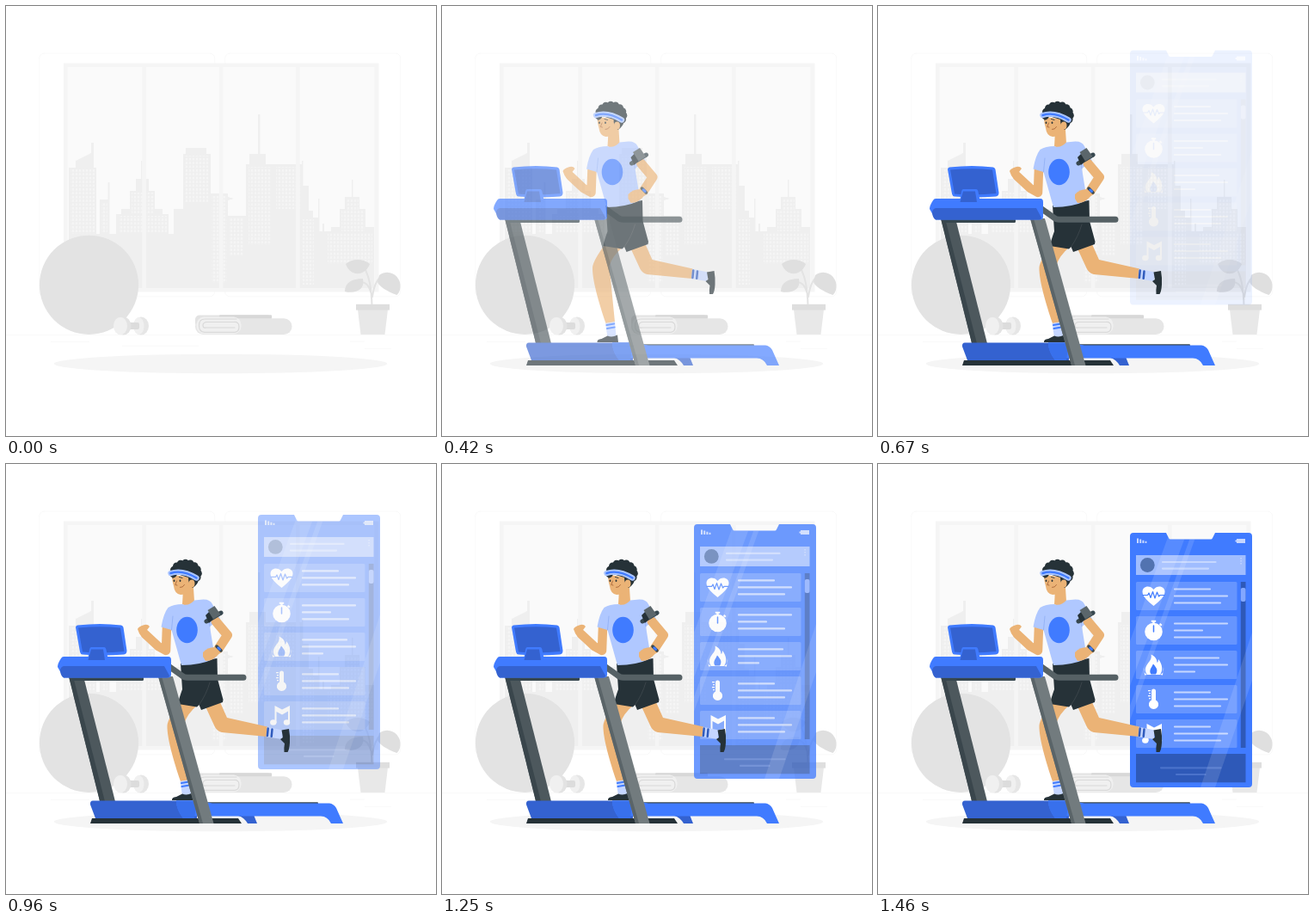
These frames come from a looping animation (500x500 px, 1.5 s). An HTML page:

```html
<!DOCTYPE html>
<html lang="en">
<head>
<meta charset="utf-8">
<title>Treadmill run</title>
<style>
html, body { margin: 0; width: 100%; height: 100%; overflow: hidden; background: #fff; }
svg { display: block; width: 100vw; height: 100vh; }
.limb { fill: none; stroke: #ebb376; stroke-linecap: round; stroke-linejoin: round; }
.line { fill: none; stroke-linecap: round; stroke-linejoin: round; }
</style>
</head>
<body>
<svg viewBox="0 0 500 500" xmlns="http://www.w3.org/2000/svg">
<defs>
  <pattern id="panes" width="4" height="4.4" patternUnits="userSpaceOnUse">
    <rect x=".8" y=".8" width="2.3" height="2.6" fill="#f5f5f5"/>
  </pattern>
  <clipPath id="screen"><path id="body" d="M297 80H335L338 86Q338.600 87.500 340 87.500H387Q388.400 87.500 389 86L392 80H431Q435 80 435 84V372Q435 376 431 376H297Q293 376 293 372V84Q293 80 297 80Z"/></clipPath>
</defs>

<g id="room">
  <g fill="none" stroke="#ebebeb" stroke-width=".3">
    <rect x="38.700" y="55.100" width="204" height="282.700" rx="5.600"/>
    <rect x="254.700" y="55.100" width="204" height="282.700" rx="5.600"/>
    <path d="M0 382.500H500M52 390.500H97M135 395.300H224M400 390H417M417 398.300H448"/>
  </g>
  <rect x="67" y="66.500" width="366.500" height="266" fill="#f5f5f5"/>
  <rect x="71.500" y="71" width="357" height="257" fill="#fafafa"/>
  <path fill="#efefef" d="M73 328V188H81V180L99 171V159H102V188H105V265H109V225H118.500V205H120.500V265H128V242H134V236H144V215H151V201H157V180H158.500V201H166V215H173V236H182V242H189V265H195V236H206V172H209V165H233V172H238V218H258V222L265 224L258 226V244H279V184H283V172H293V126H295.500V172H302V184H344V180H345.500V209H352V238H357V246H363V224H364.500V262H368V253H370V262H378V257H388V236H394V222H402V202H403.500V222H411V236H418V257H428V328Z"/>
  <path fill="url(#panes)" d="M75 190H103V265H75ZM111 228H118V264H111ZM131 244H187V264H131ZM146 217H172V242H146ZM208 174H236V228H208ZM239 221H257V322H239ZM259 246H276V290H259ZM282 187H308V278H282ZM314 187H342V236H314ZM345 248H358V324H345ZM374 264H426V300H374ZM390 238H417V262H390ZM396 224H410V238H396Z"/>
  <path fill="#f5f5f5" d="M158.300 71H163V328H158.300ZM247.800 71H252.500V328H247.800ZM337 71H341.700V328H337Z"/>

  <circle cx="96.500" cy="324.300" r="57.600" fill="#e3e3e3"/>
  <ellipse cx="157" cy="372" rx="9" ry="10.600" fill="#e6e6e6"/>
  <ellipse cx="154.500" cy="372" rx="6" ry="10" fill="#f0f0f0"/>
  <rect x="141" y="368" width="14" height="8" rx="2" fill="#dcdcdc"/>
  <ellipse cx="136.500" cy="372" rx="9" ry="10.600" fill="#e3e3e3"/>
  <ellipse cx="133" cy="372" rx="8" ry="10.300" fill="#f0f0f0"/>

  <rect x="220" y="359.500" width="89" height="14" rx="5" fill="#e3e3e3"/>
  <rect x="248" y="359.300" width="61" height="4.200" rx="1" fill="#d8d8d8"/>
  <rect x="220" y="363.300" width="112.500" height="18.700" rx="9.300" fill="#e6e6e6"/>
  <rect x="221.500" y="361.500" width="52" height="20" rx="9" fill="#f0f0f0"/>
  <path class="line" stroke="#d9d9d9" stroke-width="1.200" d="M268 364H231Q224.500 364 224.500 371.500T231 379.300H266Q271 379 271 373T265 367.500H233Q229 368 229 371.500T233 374H266"/>

  <path class="line" stroke="#e3e3e3" stroke-width="2" d="M425.500 348C425 328 422 314 417 305M425 335C422 325 419 321 412 321M426 338C428 324 433 314 441 313"/>
  <path fill="#dfdfdf" d="M395 300C403 293 416 294 423 300C418 314 401 316 395 300ZM394 332C394 322 402 317 415 317C418 330 406 335 394 332ZM434 313C446 304 460 315 458.500 327Q458 333 454.500 336C443 332 434 326 432 321Z"/>
  <path fill="#e8e8e8" d="M409 353H444L440.500 382H412.500Z"/>
  <rect x="407" y="346.800" width="39" height="6.800" fill="#dedede"/>
  <ellipse cx="249.500" cy="416" rx="193.800" ry="11.300" fill="#f5f5f5"/>
</g>

<g id="phone" opacity="0">
  <use href="#body" fill="#407bff"/>
  <g clip-path="url(#screen)">
    <rect x="300" y="106" width="127.500" height="23" fill="#fff" opacity=".5"/>
    <circle cx="313.300" cy="117.500" r="8.400" fill="#5273b0"/>
    <g id="cards"></g>
    <rect x="421.800" y="137" width="5.700" height="193" fill="#2e59b8"/>
    <rect x="421.800" y="144" width="5.700" height="16" rx="2" fill="#82a7ff"/>
    <rect x="300" y="337" width="127.500" height="33.300" fill="#2e59b8"/>
    <path class="line" stroke="#c6d7ff" stroke-width="2.200" d="M331 114H392.500M331 121.600H384"/>
    <path class="line" stroke="#4a72cb" stroke-width="2.200" d="M329 353.300H398.500M347 361H380.500"/>
    <path fill="#c6d7ff" d="M301 86.500H303V92H301ZM304.200 87.500H306.200V92H304.200ZM307.400 88.700H309.400V92H307.400ZM310.600 89.700H312.400V92H310.600ZM415.500 88.500H417V87H427V92H417V90.500H415.500ZM421.400 109H422.800V110.500H421.400ZM421.400 112H422.800V113.500H421.400ZM421.400 115H422.800V116.500H421.400Z"/>
    <path fill="#fff" opacity=".12" d="M339 80H359L293 258V206ZM365 80H371L293 298V281ZM435 196V252L392 376H375Z"/>
  </g>
  <g fill="#fff">
    <path d="M320.500 165C312 158 307.500 153.500 307.500 148.500C307.500 142 316 140 320.500 146C325 140 333.500 142 333.500 148.500C333.500 153.500 329 158 320.500 165Z"/>
    <path class="line" stroke="#407bff" stroke-width="1.200" d="M308 152.500H313.500L315 150L317 155.500L319.500 148.500L322 156L324.500 149L326.500 154L328 152.500H333"/>
    <circle cx="320.500" cy="195" r="10.300"/>
    <path d="M317.800 181.700H323.200V183.700H321.700V185.500H319.300V183.700H317.800ZM328.300 185L330.500 187L329 188.500L327 186.500Z"/>
    <path class="line" stroke="#407bff" stroke-width="1.500" d="M320.500 188V195"/>
    <path d="M313 245C308 238 313 233 316 229C318 226 318 224 317.500 221.500C323 224 324.500 228 324.500 231Q326 230 326 227C331 233 331.500 240 328 245ZM309 236Q308 243 313 245L310 245.500ZM332 236Q333 243 328 245L331 245.500Z"/>
    <path fill="#407bff" d="M317.500 244.500C314.500 240 318 237 320 232.500C324 237 326 240 323 244.500Z"/>
    <path d="M318 264Q318 261.500 320.500 261.500T323 264V274.500A5.600 5.600 0 1 1 318 274.500ZM314 263H317V264.200H314ZM315 266H317V267.200H315ZM314 269H317V270.200H314ZM315 272H317V273.200H315Z"/>
    <path d="M312.500 302L321 306.500L330 302V322H328V308.500L321 312.500L314.500 309V322H312.500Z"/>
    <ellipse cx="310.800" cy="321.500" rx="3.700" ry="3.300"/><ellipse cx="326.500" cy="321.500" rx="3.700" ry="3.300"/>
  </g>
</g>

<g id="runner" opacity="0">
  <!-- trailing leg -->
  <path fill="#ebb376" d="M231 280L249 277Q253 286 257 295L304 305.500L303 317L251 312Q246 311 243 306Z"/>
  <path fill="#c5d6ff" d="M303.500 305.800L322 309.500L321 320L302.500 317.300Z"/>
  <path class="line" stroke="#2f5bbd" stroke-width="2.500" d="M304.700 307.500L303.900 316M309.500 308.500L308.700 316.800"/>
  <path fill="#263238" d="M320.500 309.500L329 308Q330.500 316 330 324Q329.500 332 327.500 335H323.500Q323 330 324 325L319 320L322 318Z"/>
  <!-- leading leg -->
  <path fill="#ebb376" d="M203 276L223 280Q211 290 207 302L213.500 367.500L203 369C195 346 187 318 187.500 304Q188 296 203 276Z"/>
  <path fill="#c5d6ff" d="M202.500 369L213.500 367L215 384L205 385.500Z"/>
  <path class="line" stroke="#407bff" stroke-width="2" d="M204 371L212.700 369.500M204.500 375L213.200 373.500"/>
  <path fill="#263238" d="M205 383.500Q210 386 216.500 382.500L217.500 391H193Q192.500 387.500 198 387Z"/>
  <path fill="#263238" d="M203 232L245.500 226L246 250L252.500 274L252 277L227 286L224.500 280L222 282.500L200 279Q201 273 205 262Z"/>
  <path class="line" stroke="#40494e" stroke-width=".8" d="M224.500 280Q233 268 237 254"/>
  <!-- torso and arms -->
  <path class="limb" stroke-width="10.500" d="M187 189L186 217L177 212L162 198"/>
  <path fill="#ebb376" d="M153 192Q154 189 161 187Q165 186 167 189L164 193L168 199L164 205Q156 202 153 192Z"/>
  <path fill="#ebb376" d="M206 146L218 144L219 160Q213 168 205 163Z"/>
  <path fill="#b0c8ff" d="M205 163Q212 166 219 158.500L229 157.500Q237 157 240 163L249 180L237 189L243 226Q226 234 204 234L192.500 193L180.500 189.500Q183 174 188.500 167Q195 163 205 163Z"/>
  <path class="line" stroke="#92b0f5" stroke-width=".9" d="M192.500 193L194 177M237 189L234 176"/>
  <ellipse cx="210.500" cy="193" rx="12.300" ry="15.200" fill="#407bff"/>
  <path class="limb" stroke-width="11" d="M244 183L257.500 199L247 215"/>
  <path fill="#ebb376" d="M229 219Q234 213 243 213L249 219Q242 229 232 229L229 224Z"/>
  <path class="line" stroke="#37474f" stroke-width="5" stroke-linecap="butt" d="M233 183L250 173"/>
  <path fill="#263238" d="M232 176L237 171L243 178L236 185Z"/>
  <path fill="#5b666b" d="M234.500 170L242.500 165L249.500 175L241 180.500Z"/>
  <path class="line" stroke="#37474f" stroke-width="3.500" d="M245 212L250 217"/>
  <path class="line" stroke="#407bff" stroke-width="3" d="M246.800 213.800L248.500 215.500"/>
  <!-- head -->
  <path fill="#ebb376" d="M193 129L219 132Q222 137 218 144L214 147Q209 152 203 152Q196 151 195 142Q193 136 193 129Z"/>
  <g id="curls" fill="#263238"></g>
  <path fill="#263238" d="M192 126Q195 114 208 114Q223 116 225 130Q224 140 217 144Q212 140 212 132Z"/>
  <ellipse cx="216" cy="139" rx="3.500" ry="4.600" fill="#ebb376"/>
  <path class="line" stroke="#a9c4ff" stroke-width="6.400" stroke-linecap="butt" d="M191.500 127Q205 122.500 221.500 132.500"/>
  <path class="line" stroke="#407bff" stroke-width="2.400" stroke-linecap="butt" d="M191.500 127Q205 122.500 221.500 132.500"/>
  <path class="line" stroke="#263238" stroke-width=".9" d="M193.700 132.500L196 131.500M201.500 131.500L205 132.500"/>
  <ellipse cx="195.500" cy="135.700" rx=".9" ry="1.300" fill="#263238"/>
  <ellipse cx="202.500" cy="135.700" rx=".9" ry="1.300" fill="#263238"/>
  <path class="line" stroke="#a35f32" stroke-width=".8" d="M198.500 136L196.800 140.500L199 141M202.500 143.500Q205.500 144 207.500 140.500"/>
</g>

<g id="mill" opacity="0">
  <path fill="#263238" d="M100 412H270L274 418H98Z"/>
  <path fill="#4d585d" d="M73 247H90L132 412H114Z"/>
  <path fill="#3a464c" d="M73 247H78L120 412H114Z"/>
  <rect x="76" y="247" width="84" height="5" rx="1.500" fill="#37474f"/>
  <path class="line" stroke="#37474f" stroke-width="2" d="M232 394.200H362"/>
  <path fill="#3462d0" d="M270 408H288L292 418H281Q277 411 270 409Z"/>
  <path fill="#3462d0" d="M101 391.500H222V412H104L98 396Q97.500 391.500 101 391.500Z"/>
  <path fill="#407bff" d="M198 391.500H222L240 394.500H376Q381 395 384 400L392 418H378Q374 409.500 366 409.500H219V412H206Q198 402 198 391.500Z"/>
  <path fill="#3870ec" d="M198 391.500H222L219 412H206Q198 402 198 391.500Z"/>
  <path fill="#727b7e" d="M177 247H194L241.500 418H225Z"/>
  <path fill="#5a6468" d="M177 247H181L229 418H225Z"/>
  <path class="line" stroke="#566165" stroke-width="7" d="M189 235L204.500 246Q207 248.300 211 248.300H276"/>
  <path fill="#407bff" d="M67 224H189Q192 224 192 228V245Q192 248.500 188 248.500H67L60 236Q60 232 64 226Q65 224 67 224Z"/>
  <path fill="#3462d0" d="M67 235H184L190 246Q190 248 187 248.500H67Q64 247 63 241Q63 236 67 235Z"/>
  <path fill="#407bff" d="M83 187.500Q110 184.500 134 187.500Q136 188 136.500 190L140.500 217Q140.500 221 137 221.500Q112 223.500 89 221.500Q86.500 221 86 218.500L81 190Q81 188 83 187.500Z"/>
  <path fill="#3462d0" d="M84 190.500Q110 188 133 190.500L137.500 218Q112 220.500 89 218.500Z"/>
  <path fill="#407bff" d="M99 213H114Q116 213 116.500 216L119 228H95L97 216Q97.500 213 99 213Z"/>
  <path fill="#3462d0" d="M99 215.500H113L115 228H95.500Z"/>
</g>
</svg>
<script>
const $ = id => document.getElementById(id);
const NS = 'http://www.w3.org/2000/svg';
const add = (parent, tag, attrs) => {
  const el = document.createElementNS(NS, tag);
  for (const key in attrs) el.setAttribute(key, attrs[key]);
  parent.append(el);
};

// Right ends of the three text lines on each card
const rows = [[386, 406, 398], [406, 377, 398], [396, 406, 368], [386, 406, 398], [386, 406, 398]];
rows.forEach((ends, i) => {
  const y = 137 + i * 40;
  add($('cards'), 'rect', { x: 300, y, width: 117.5, height: 33, rx: 1.5, fill: '#fff', opacity: .2 });
  add($('cards'), 'path', {
    class: 'line', stroke: '#c6d7ff', 'stroke-width': 2.2,
    d: ends.map((x, j) => `M345 ${y + 8.5 + j * 8}H${x}`).join('')
  });
});

for (let i = 0; i < 11; i++) {
  const a = Math.PI * (.98 + i * .128);
  add($('curls'), 'circle', { cx: 209 + 14.5 * Math.cos(a), cy: 127 + 12 * Math.sin(a), r: 4.3 });
}

const LOOP = 1500, FPS = 24;
const clamp = v => Math.min(1, Math.max(0, v));
const progress = (k, from, to) => clamp((k - from) / (to - from));

function draw(now) {
  const k = Math.floor((now % LOOP) * FPS / 1000 + .1);
  const run = progress(k, 1, 15);
  const drop = progress(k, 14, 35);
  const fall = drop * (.47 + .53 * drop);
  $('mill').setAttribute('opacity', run);
  $('runner').setAttribute('opacity', run);
  $('runner').setAttribute('transform', `translate(${-35 * (1 - run)} 0)`);
  $('phone').setAttribute('opacity', drop);
  $('phone').setAttribute('transform', `translate(0 ${-30 * (1 - fall)})`);
}

const start = performance.now();
function tick() {
  draw(performance.now() - start);
  requestAnimationFrame(tick);
}
tick();
</script>
</body>
</html>
```
